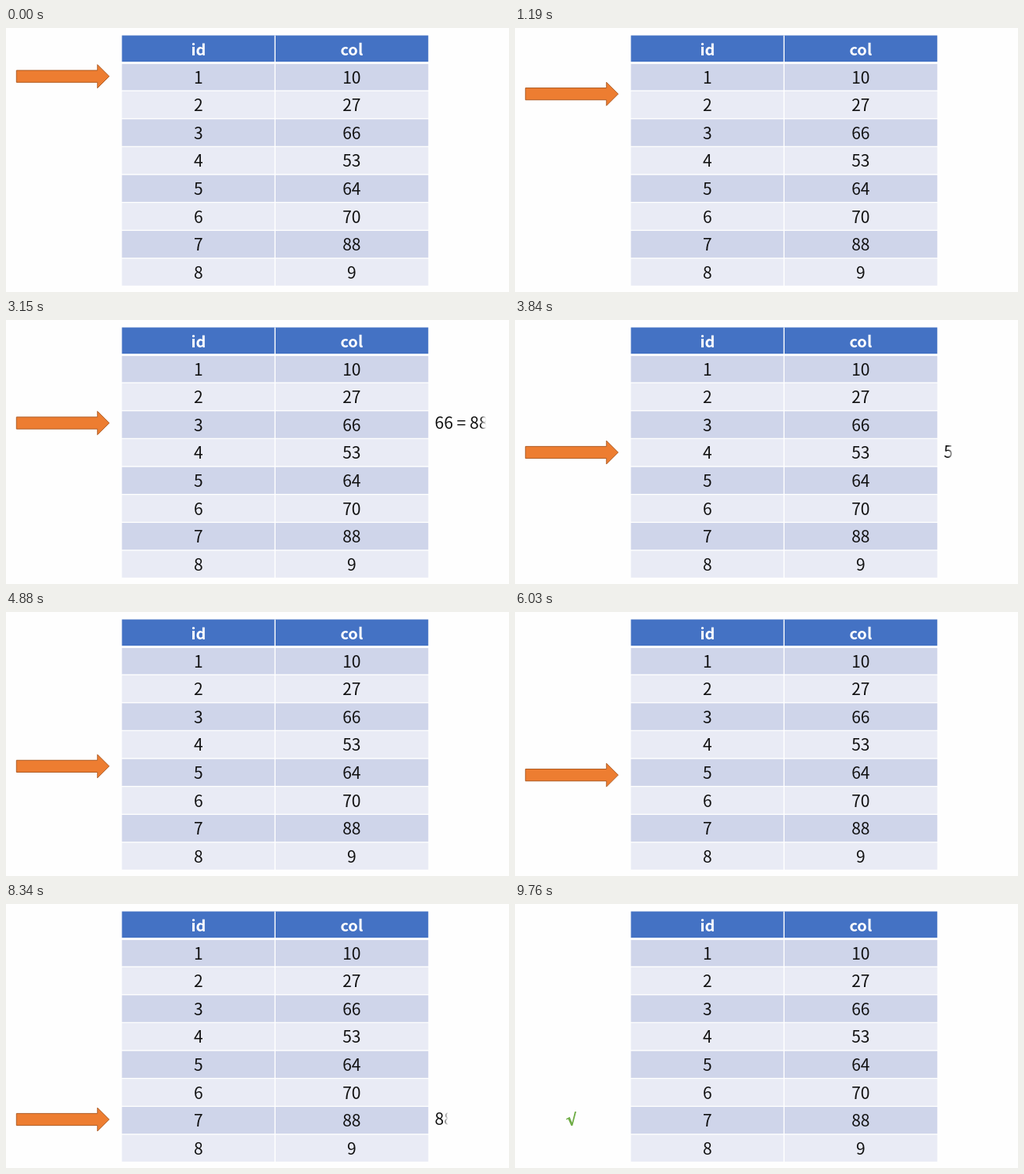
An HTML page with a canvas for the animation above (10 s loop, 640 by 337 pixels).

```html
<!DOCTYPE html>
<html lang="en">
<head>
<meta charset="utf-8">
<title>Table scan</title>
<style>
  html, body { margin: 0; width: 100%; height: 100%; overflow: hidden; background: #fefefe; }
  canvas { display: block; width: 640px; height: 337px; }
</style>
</head>
<body>
<canvas id="stage"></canvas>
<script>
const LOOP = 10000, WIPE = 330, HOLD = 150, MOVE = 420, SOFT = 7;
const FONT = '"Noto Sans CJK SC", "Noto Sans CJK", "Noto Sans CJK JP", "Noto Sans", sans-serif';
const TABLE = { left: 147.5, middle: 342.3, right: 537.3, top: 9.5, body: 44.5, pitch: 35.63 };

const values = [10, 27, 66, 53, 64, 70, 88, 9];
const wanted = 88;
const arrowStops = [61.7, 95.5, 131.5, 169, 204, 241, 275, 309];
const shownAt = [390, 1690, 2915, 4128, 5420, 6700, 7920, 9190];
const moveAt = [942, 2148, 3371, 4594, 5931, 7173, 8410];
const checkAt = 8410, arrowEnd = 9760;

const canvas = document.getElementById('stage');
const ratio = window.devicePixelRatio || 1;
canvas.width = 640 * ratio;
canvas.height = 337 * ratio;
const ctx = canvas.getContext('2d');
ctx.scale(ratio, ratio);

const clamp = x => Math.max(0, Math.min(1, x));
const ease = x => x < 0.5 ? 2 * x * x : 1 - 2 * (1 - x) ** 2;

function box(color, x, y, right, bottom) {
  ctx.fillStyle = color;
  ctx.fillRect(x, y, right - x, bottom - y);
}

function label(text, x, y, font, color, align = 'center') {
  ctx.font = font + ' ' + FONT;
  ctx.textAlign = align;
  ctx.fillStyle = color;
  ctx.fillText(text, x, y);
}

function polygon(points) {
  ctx.beginPath();
  points.forEach(([x, y]) => ctx.lineTo(x, y));
  ctx.closePath();
}

function drawTable() {
  const { left, middle, right, top, body, pitch } = TABLE;
  const idX = (left + middle) / 2, colX = (middle + right) / 2;
  box('#4472c4', left, top, right, 43);
  label('id', idX, 34.6, 'bold 20px', '#fff');
  label('col', colX, 34.6, 'bold 20px', '#fff');
  values.forEach((value, i) => {
    const y = body + i * pitch;
    box(i % 2 ? '#e9ebf5' : '#cfd5ea', left, y + (i ? 0.7 : 1.5), right, y + pitch - 0.7);
    label(i + 1, idX, y + 26.1, '300 21px', '#111');
    label(value, colX, y + 26.1, '300 21px', '#111');
  });
  box('#fff', middle - 0.7, top, middle + 0.7, body + 8 * pitch);
}

function arrowY(t) {
  return moveAt.reduce((y, start, i) =>
    y + (arrowStops[i + 1] - arrowStops[i]) * ease(clamp((t - start) / MOVE)), arrowStops[0]);
}

function drawArrow(y) {
  polygon([[13.3, y - 7.6], [116.3, y - 7.6], [116.3, y - 15], [131.3, y],
    [116.3, y + 15], [116.3, y + 7.6], [13.3, y + 7.6]]);
  ctx.fillStyle = '#ed7d31';
  ctx.fill();
  ctx.strokeStyle = '#ae5a21';
  ctx.lineWidth = 1;
  ctx.stroke();
}

function drawCheck() {
  polygon([[65, 274.2], [69.6, 271.8], [72.6, 279], [76, 265], [78, 265],
    [73.3, 283], [71.4, 283], [67.6, 274.6], [65.6, 275.5]]);
  ctx.fillStyle = '#70ad47';
  ctx.fill();
}

// Each comparison wipes in from the left and back out from the right.
function drawComparison(i, t) {
  const shown = Math.min(clamp(1 + (t - shownAt[i]) / WIPE),
    clamp(1 - (t - shownAt[i] - HOLD) / WIPE));
  if (shown === 0) return;
  const edge = 540 + 86 * shown;
  const fade = ctx.createLinearGradient(edge, 0, edge + SOFT, 0);
  fade.addColorStop(0, 'rgba(17,17,17,1)');
  fade.addColorStop(1, 'rgba(17,17,17,0)');
  const x = values[i] < 10 ? 557.5 : 545.6;
  label(`${values[i]} = ${wanted}?`, x, arrowStops[i] + 7.2, '300 21px', fade, 'left');
}

function draw(t) {
  box('#fefefe', 0, 0, 640, 337);
  drawTable();
  if (t < arrowEnd) drawArrow(arrowY(t));
  if (t >= checkAt) drawCheck();
  values.forEach((_, i) => drawComparison(i, t));
}

let origin;
function tick(now) {
  origin ??= now;
  draw((now - origin) % LOOP);
  requestAnimationFrame(tick);
}
draw(0);
requestAnimationFrame(tick);
</script>
</body>
</html>
```
